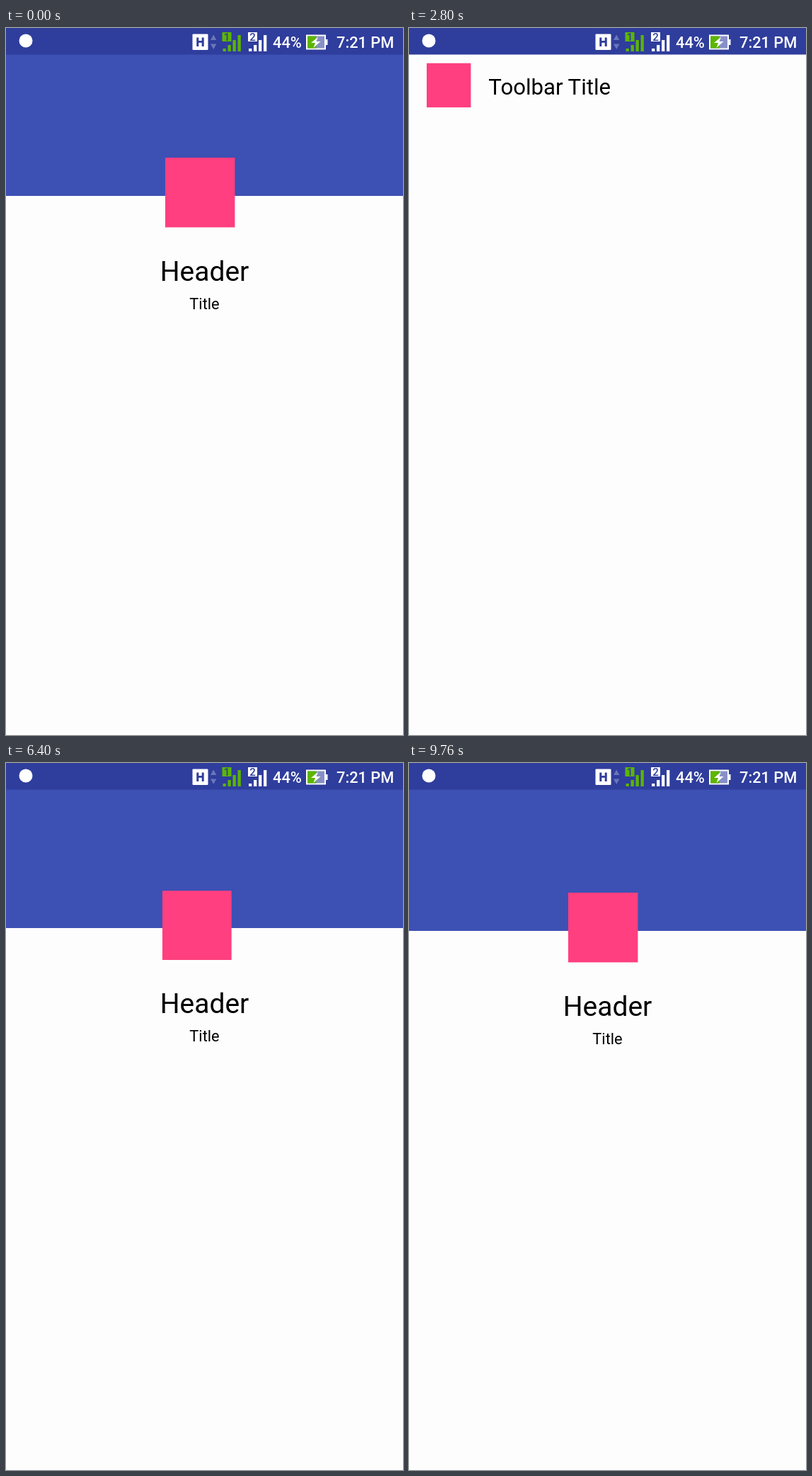
An HTML page that plays this animation: 561 px wide and 998 px high, repeating every 9840 ms.

```html
<!DOCTYPE html>
<html lang="en">
<head>
<meta charset="utf-8">
<title>Collapsing header</title>
<style>
  html, body { margin: 0; width: 100%; height: 100%; overflow: hidden; background: #fdfdfd; }
  svg { display: block; width: 561px; height: 998px; }
  text { font-family: Roboto, sans-serif; }
  .status text { font-weight: 500; }
</style>
</head>
<body>
<svg viewBox="0 0 561 998">
  <defs>
    <clipPath id="details"><rect id="clip" width="561"/></clipPath>
  </defs>
  <rect width="561" height="998" fill="#fdfdfd"/>
  <rect id="banner" width="561" fill="#3d50b4"/>
  <g clip-path="url(#details)">
    <g id="labels" text-anchor="middle">
      <text x="280.5" y="356.5" font-size="39">Header</text>
      <text x="280.5" y="397" font-size="21.8">Title</text>
    </g>
  </g>
  <text id="title" x="112.3" font-size="31.16">Toolbar Title</text>
  <rect id="avatar" fill="#ff3f7f"/>

  <g class="status" fill="#fff">
    <rect width="561" height="37.5" fill="#2f3d9c"/>
    <circle cx="28" cy="18" r="9.5"/>
    <rect x="263.5" y="8.5" width="22" height="22.5" rx="1"/>
    <path d="M269.3 13.5h3v4.6h4.4v-4.6h3v12.4h-3v-5.2h-4.4v5.2h-3z" fill="#2f3d9c"/>
    <path d="M289 17l4.2-7.5 4.2 7.5zM289 22.500h8.400l-4.200 7.500z" fill="#6b76ba"/>
    <g id="sim1" fill="#5cb502"></g>
    <g id="sim2"></g>
    <text x="377" y="28" font-size="21.8">44%</text>
    <rect x="425" y="10.500" width="26" height="19" fill="#8790c6" stroke="#fff" stroke-width="2"/>
    <rect x="426" y="11.500" width="12.500" height="17" fill="#5cb502"/>
    <rect x="452" y="16" width="2.500" height="8"/>
    <path d="M441 12.500l-10 8.500h6l-2.500 7 10-9h-6z"/>
    <text x="467" y="28" font-size="21.8">7:21 PM</text>
  </g>
</svg>
<script>
const LOOP = 9840, STEP = 80;
const $ = id => document.getElementById(id);
const set = (id, attrs) => {
  for (const key in attrs) $(id).setAttribute(key, attrs[key]);
};

// Scroll distance at key times: [ms, px]
const drags = [
  [[960, 0], [1040, 2], [2000, 81.5], [2080, 96], [2800, 200]],
  [[3840, 200], [3920, 198.5], [4480, 135.5], [4880, 75], [5440, 0]],
  [[6320, 0], [6400, 4], [7200, 97.5], [7360, 134], [7760, 200]],
  [[8720, 200], [8800, 199.5], [9760, 0]]
];

const slope = (a, b) => (b[1] - a[1]) / (b[0] - a[0]);

// Monotone tangent, at rest on both ends
function tangent(pts, i) {
  if (i === 0 || i === pts.length - 1) return 0;
  const p = slope(pts[i - 1], pts[i]), q = slope(pts[i], pts[i + 1]);
  return p * q > 0 ? 2 * p * q / (p + q) : 0;
}

function scrollAt(t) {
  let value = 0;
  for (const pts of drags) {
    if (t < pts[0][0]) break;
    value = pts[pts.length - 1][1];
    for (let i = 0; i < pts.length - 1; i++) {
      const [t0, v0] = pts[i], [t1, v1] = pts[i + 1];
      if (t < t0 || t >= t1) continue;
      const d = t1 - t0, u = (t - t0) / d, w = 1 - u;
      return v0 * w * w * (1 + 2 * u) + v1 * u * u * (3 - 2 * u)
        + d * u * w * (tangent(pts, i) * w - tangent(pts, i + 1) * u);
    }
  }
  return value;
}

function drawSim(id, x, digit) {
  const bars = [[1, 29], [8, 24], [15, 17], [22, 10]]
    .map(([dx, y]) => `<rect x="${x + dx}" y="${y}" width="4.3" height="${33 - y}"/>`);
  $(id).innerHTML = `<rect x="${x}" y="6" width="13" height="13"/>${bars.join("")}
    <text x="${x + 6.5}" y="17.8" font-size="15" text-anchor="middle" fill="#2f3d9c">${digit}</text>`;
}

function render(time) {
  const s = scrollAt(Math.floor(time % LOOP / STEP) * STEP);
  const size = 98.4 - 0.18 * s;
  const edge = 237 - s;
  set("banner", { height: Math.max(0, edge) });
  set("avatar", { x: 225 - s, y: 183 - s * 2 / 3, width: size, height: size });
  set("labels", { transform: `translate(0 ${-s})` });
  set("clip", { y: edge + 87, height: Math.max(0, 80 * (1 - s / 119.5)) });
  set("title", { y: 293.5 - s, visibility: s > 119 ? "visible" : "hidden" });
}

drawSim("sim1", 305.5, 1);
drawSim("sim2", 342, 2);

const start = performance.now();
function tick() {
  render(performance.now() - start);
  requestAnimationFrame(tick);
}
tick();
</script>
</body>
</html>
```
